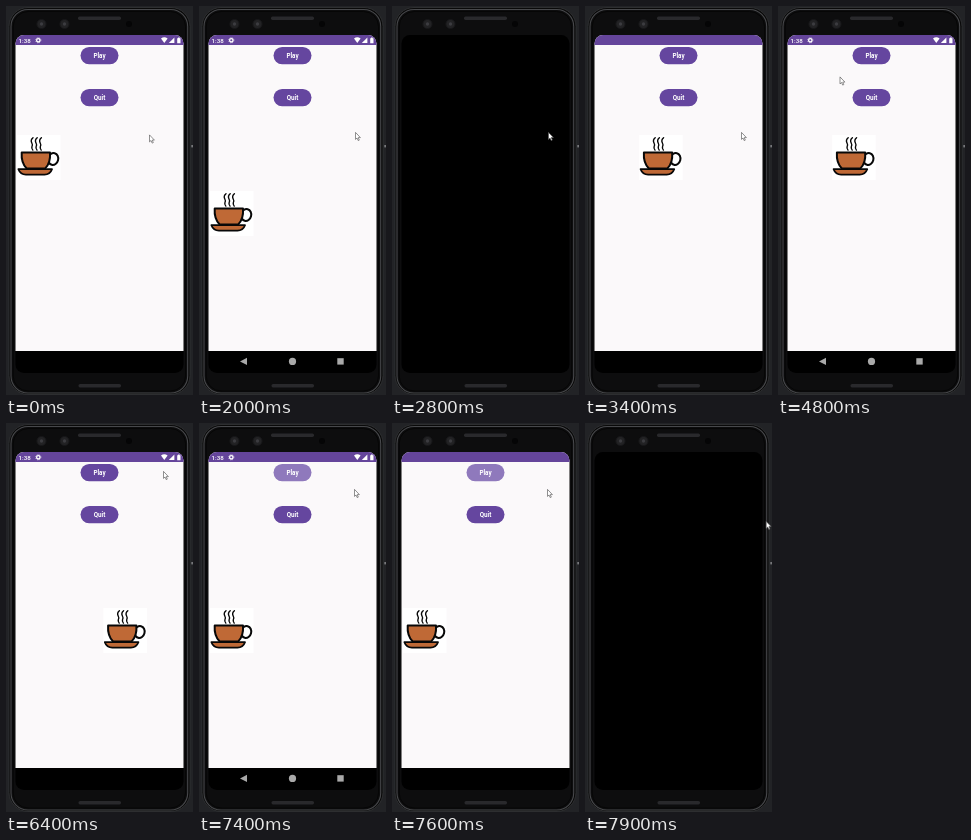
These frames come from a looping animation (187 px wide and 389 px high, 8000 ms). An HTML page:

```html
<!DOCTYPE html>
<html lang="en">
<head>
<meta charset="utf-8">
<title>Moving cup</title>
<style>
  html, body { margin: 0; width: 100%; height: 100%; overflow: hidden; background: #222326; }
  svg { display: block; width: 100%; height: 100%; }
  text { font-family: Roboto, "Open Sans", sans-serif; fill: #fff; }
  .label { font-size: 6.3px; font-weight: 600; text-anchor: middle; }
</style>
</head>
<body>
<svg viewBox="0 0 187 389" preserveAspectRatio="none">
  <defs>
    <clipPath id="glass"><rect x="9.5" y="29" width="168" height="338" rx="8.5"/></clipPath>
    <path id="steam" d="M2.4 0C-2.4 4 3.6 5.5 1.4 8.6Q.6 10.4 2.2 12.3"/>
    <g id="lens">
      <circle r="4.6" fill="#222224" stroke="#171719"/>
      <circle r="1.7" fill="#3c3c40"/>
    </g>
  </defs>

  <!-- phone body -->
  <rect width="187" height="389" fill="#222326"/>
  <rect x="185.3" y="139" width="1.7" height="2.4" fill="#77787b"/>
  <rect x="3" y="1.5" width="181" height="387" rx="19" fill="#090909" stroke="#303134" stroke-width=".9"/>
  <rect x="5" y="3.5" width="176.7" height="383.5" rx="17" fill="#0d0d0e" stroke="#47484b" stroke-width="1.1"/>
  <rect x="7.2" y="5.5" width="172.3" height="379.5" rx="15" fill="#0d0d0e" stroke="#060606"/>
  <rect x="72" y="10.5" width="43" height="3.4" rx="1.6" fill="#29292c"/>
  <rect x="72.5" y="378" width="42.5" height="3.4" rx="1.6" fill="#29292c"/>
  <use href="#lens" x="35.5" y="18"/>
  <use href="#lens" x="58.5" y="18"/>
  <circle cx="123" cy="18" r="3" fill="#050506"/>

  <!-- display -->
  <g clip-path="url(#glass)">
    <rect x="9" y="29" width="169" height="338"/>
    <g id="app">
      <rect x="9" y="29" width="169" height="316" fill="#fbf9fa"/>
      <rect x="9" y="29" width="169" height="10" fill="#65459b"/>
      <g id="status" fill="#fff">
        <text x="12.5" y="36.6" font-size="6.2" font-weight="500">1:38</text>
        <circle cx="32.3" cy="34.3" r="1.7" fill="none" stroke="#fff" stroke-width="1.3"/>
        <circle cx="32.3" cy="34.3" r="2.6" fill="none" stroke="#fff" stroke-width=".7" stroke-dasharray="1 1.04"/>
        <path d="M155 32.4Q158.3 30.2 161.6 32.4L158.3 37Z"/>
        <path d="M168.4 31.4V37H162.8Z"/>
        <path d="M171.2 32.2H172.1V31.4H173.6V32.2H174.5V37.2H171.2Z"/>
      </g>
      <rect id="play" x="74.5" y="41" width="38" height="17.2" rx="8.6"/>
      <text class="label" x="93.5" y="51.9">Play</text>
      <rect x="74.5" y="83" width="38" height="17.2" rx="8.6" fill="#65469f"/>
      <text class="label" x="93.5" y="94">Quit</text>

      <g id="cup" stroke="#080808" stroke-linecap="round" stroke-linejoin="round">
        <rect x="0" y="-2" width="43.5" height="45" fill="#fff" stroke="none"/>
        <g fill="none">
          <g stroke-width="1.4">
            <use href="#steam" x="13.6" y=".8"/>
            <use href="#steam" x="17.8" y=".8"/>
            <use href="#steam" x="22" y=".8"/>
          </g>
          <ellipse cx="36.2" cy="22" rx="5" ry="6" stroke-width="2" transform="rotate(14 36.2 22)"/>
        </g>
        <g fill="#bf6936">
          <path d="M1.4 32.2H35Q33 37.6 27.5 37.6H8.9Q3.4 37.6 1.4 32.2Z" stroke-width="1.8"/>
          <path d="M4.7 15.6H33Q33.7 26 28.2 31.4H9.7Q4 26 4.7 15.6Z" stroke-width="2"/>
        </g>
      </g>
    </g>
    <g id="nav" fill="#a9a9a9">
      <path d="M41 355.4L48 351.8V359Z"/>
      <circle cx="93.5" cy="355.4" r="3.6"/>
      <rect x="138.3" y="352.2" width="6.4" height="6.4"/>
    </g>
  </g>

  <path id="pointer" d="M.5 .4V7.4L2 6 3.2 8.6 4.3 8.1 3.2 5.6H5.4Z" fill="#fff" stroke="#555" stroke-width=".65"/>
</svg>
<script>
const LOOP = 8000, STEP = 100, MOVE = 200;
const $ = id => document.getElementById(id);

// Each time the screen is on; the cup takes a new cell of a 3-wide grid every second.
const sessions = [
  { wake: -600, sleep: 2800, navDelay: 1100, cells: [0, 1, 3, 1] },
  { wake: 3400, sleep: 5300, navDelay: 500, cells: [6, 1] },
  { wake: 6000, sleep: 7800, navDelay: 1100, cells: [5, 3] }
];

const pointerStart = { x: 143, y: 128.5 };
const pointerStops = [
  { at: 1700, x: 156, y: 126 },
  { at: 4800, x: 61.5, y: 70.5 },
  { at: 5400, x: 147, y: 63 },
  { at: 6400, x: 157, y: 48 },
  { at: 7400, x: 155, y: 66 },
  { at: 7900, x: 180.7, y: 98 }
];

const ramp = (t, from, length) => Math.min(1, Math.max(0, (t - from) / length));
const place = (id, x, y) => $(id).setAttribute("transform", `translate(${x} ${y})`);
const fade = (id, value) => $(id).setAttribute("opacity", value);

function cupCell(i, age) {
  // On waking, the last picture stays up for a moment.
  if (age < STEP) return sessions[i - 1].cells.at(-1);
  const { cells } = sessions[i];
  return cells[Math.min(Math.floor(age / 1000), cells.length - 1)];
}

function pointerAt(t) {
  return pointerStops.reduce((p, stop) => {
    const k = ramp(t, stop.at - MOVE, MOVE);
    return { x: p.x + (stop.x - p.x) * k, y: p.y + (stop.y - p.y) * k };
  }, pointerStart);
}

function draw(now) {
  const t = Math.floor(now % LOOP / STEP) * STEP;
  const i = sessions.findLastIndex(s => s.wake <= t);
  const { wake, sleep, navDelay } = sessions[i];
  const age = t - wake, left = sleep - t;
  const cell = cupCell(i, age);
  const bars = left > 200 ? 1 : 0;
  const pointer = pointerAt(t);

  place("cup", 11 + cell % 3 * 43.2, 131 + Math.floor(cell / 3) * 56);
  place("pointer", pointer.x, pointer.y);
  fade("app", left > 0 ? 1 : 0);
  fade("status", bars * ramp(age, 100, 300));
  fade("nav", bars * ramp(age, navDelay, 200));
  $("play").setAttribute("fill", left <= 400 ? "#8f79bc" : "#65469f");
}

const start = performance.now();
function tick() {
  draw(performance.now() - start);
  requestAnimationFrame(tick);
}
tick();
</script>
</body>
</html>
```
